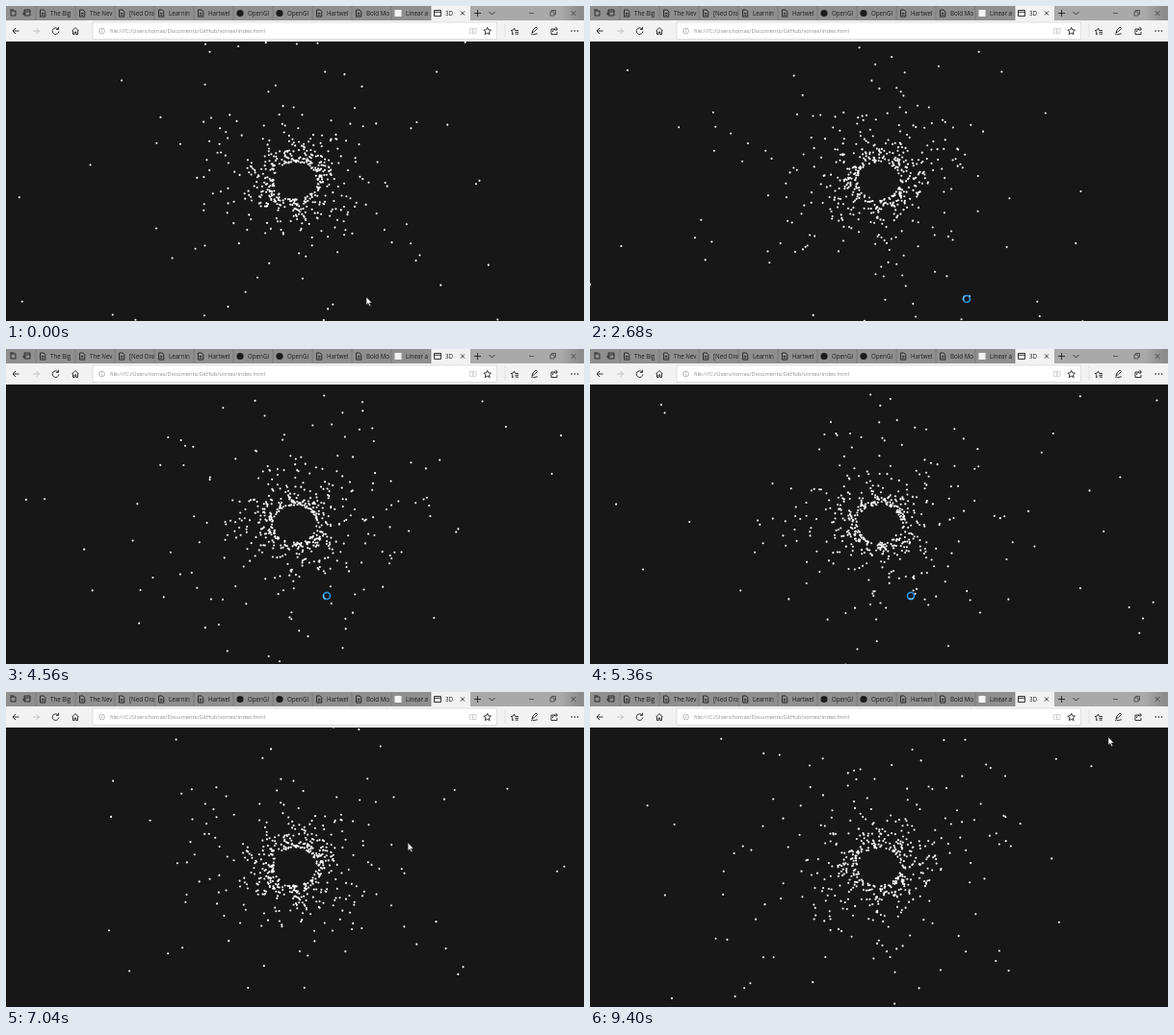
Animation of 600 by 328 pixels, one loop 9.44 s. Source, as an HTML page with a canvas:

```html
<!DOCTYPE html>
<html lang="en">
<head>
<meta charset="utf-8">
<title>3D</title>
<style>
  html, body { margin: 0; width: 100%; height: 100%; overflow: hidden; background: #171718; }
  canvas, svg { position: absolute; left: 0; top: 0; width: 600px; height: 328px; }
  text { font-family: "Open Sans", "Noto Sans", sans-serif; }
  .line { fill: none; stroke: #222; stroke-width: .9; }
  .thin { stroke-width: .6; }
  .pale { stroke: #bbb; }
</style>
</head>
<body>
<canvas id="space" width="600" height="328"></canvas>
<svg viewBox="0 0 600 328">
  <linearGradient id="glass">
    <stop offset=".8" stop-color="#a9a9a9"/>
    <stop offset=".96" stop-color="#8c8c8c"/>
  </linearGradient>
  <rect width="600" height="15" fill="#8f8f8f"/>
  <rect x="482" width="118" height="15" fill="url(#glass)"/>
  <rect y="15" width="600" height="22" fill="#f2f2f2"/>
  <g id="tabs" font-size="6.2" fill="#1c1c1c"></g>

  <!-- window controls -->
  <path class="line" d="M5 5h5v5h-5zM4 4h4M19 4h6v6h-6zM19 6h6M21 8h-4"/>
  <path class="line" d="M486 7.500h7M489.500 4v7M501.500 6l3 3 3-3"/>
  <path class="line thin" d="M543 7.500h5M565 6h4v4h-4zM566.500 6v-1.500h4v4h-1.500M586.500 5l5 5m0-5l-5 5"/>

  <!-- address row -->
  <path class="line" d="M13.500 26h-6.500M10 23l-3 3 3 3"/>
  <path class="line pale" d="M28 26h6.500M31.500 23l3 3-3 3"/>
  <path class="line" d="M54 24a3.300 3.300 0 1 0 .8 2.500M54.500 21.800v2.500h-2.500"/>
  <path class="line" d="M68.500 26l3.500-3.500 3.500 3.500M69.500 25.500v4h1.700v-2.500h1.600v2.500h1.700v-4"/>
  <rect x="90" y="17" width="419.500" height="17.500" fill="#fff" stroke="#d4d4d4" stroke-width=".7"/>
  <g fill="none" stroke="#999" stroke-width=".7">
    <circle cx="99.500" cy="26" r="2.900"/>
    <path d="M99.500 25.500v2M99.500 24.200v.7"/>
    <path d="M481.500 23.500h3.300v5h-3.300zM484.800 23.500h3.300v5h-3.300z" stroke="#c4c4c4"/>
    <path d="M518 18v15" stroke="#ddd"/>
  </g>
  <text x="108" y="28.200" font-size="5.750" fill="#8b8b8b">file:///C:/Users/tomas/Documents/GitHub/vortex/index.html</text>
  <rect id="hover" x="538.500" y="16" width="19" height="19" fill="#dcdcdc" stroke="#bdbdbd" stroke-width=".7"/>
  <g class="line">
    <path d="M499.700 22.300l1.100 2.500 2.700.3-2 1.800.6 2.700-2.400-1.400-2.400 1.400.6-2.700-2-1.800 2.700-.3z"/>
    <path d="M527 29l-1.500.5.4-2.400-1.700-1.600 2.300-.4 1-2.100 1 2.100M528.500 25.500h3.500M528.500 27.300h3.500M528.500 29.100h3.500"/>
    <path d="M546 28l1-3 3-3 1.500 1.500-3 3zM545 29.500c2-1.500 2 1 4 0s2-.5 3-.5"/>
    <path d="M570 24h-4v5.500h6v-2.500M567.500 27c.2-2 1.500-3 4.500-3M570.500 22l2 2-2 2"/>
  </g>
  <path d="M586.500 26h8" stroke="#333" stroke-width="1.300" stroke-dasharray="1.300 1.900"/>

  <path id="arrow" d="M0 0v8.200l1.900-1.700 1.400 3 1.300-.6-1.400-2.900h2.600z" fill="#fff" stroke="#222" stroke-width=".5"/>
  <g id="busy" fill="none" stroke-width="1.600">
    <circle r="3.500" stroke="#2b95dc"/>
    <path id="glint" d="M0-3.500a3.500 3.500 0 0 1 3.500 3.500" stroke="#62c3f7"/>
  </g>
</svg>
<script>
const LOOP = 9440, STEP = 40;
const CX = 300, CY = 182, RX = 22.2, RY = 19.4;
const COUNT = 560, DOT = 1.05;
const $ = id => document.getElementById(id);

// ---- tabs ----
const tabs = [
  ["page", "The Big"], ["page", "The Nev"], ["page", "[Ned Ora"], ["page", "Learnin"],
  ["page", "Hartwel"], ["dot", "OpenGl"], ["dot", "OpenGl"], ["page", "Hartwel"],
  ["page", "Bold Mo"], ["square", "Linear a"], ["window", "3D"]
];
const icons = {
  page: '<path class="line" d="M-2.500-3.500h3.500l1.800 1.800v5.300h-5.300zM-1.200 0h2.600M-1.200 1.700h2.600"/>',
  dot: '<circle r="3.600" fill="#1c1c1c"/>',
  square: '<rect x="-3.500" y="-3.500" width="7" height="7" fill="#f4f4f4"/>',
  window: '<path class="line" d="M-3.500-3h7v6h-7zM-3.500-1.200h7"/>'
};
$("tabs").innerHTML = tabs.map(([icon, label], i) => {
  const x = 31 + 41 * i, active = i === tabs.length - 1;
  return (active ? `<rect x="${x}" width="41" height="15.500" fill="#f2f2f2"/>` : "") +
    `<path d="M${x} 0v15" stroke="#747474" stroke-width=".7"/>` +
    `<g transform="translate(${x + 7} 7.500)">${icons[icon]}</g>` +
    `<text x="${x + 15}" y="9.800">${label}</text>` +
    (active ? `<path class="line" d="M${x + 31} 5.500l4 4m0-4l-4 4"/>` : "");
}).join("");

// ---- tunnel of points ----
let seed = 7321;
function rand() {
  seed = (seed * 1664525 + 1013904223) % 4294967296;
  return seed / 4294967296;
}
const points = Array.from({ length: COUNT }, () => ({ angle: rand() * 2 * Math.PI, z: rand() }));

// The picture hangs a few times before it runs smoothly.
const hangs = [440, 600, 800];
function travel(t) {
  const jumps = hangs.filter(h => t >= h).length;
  return jumps * .0075 + Math.max(0, t - 800) / STEP * .0065;
}

const ctx = $("space").getContext("2d");
function drawPoints(t) {
  const shift = travel(t);
  ctx.fillStyle = "#171718";
  ctx.fillRect(0, 0, 600, 328);
  ctx.fillStyle = "#fff";
  ctx.beginPath();
  for (const p of points) {
    const z = (p.z - shift + 3) % 1 || 1;
    const x = CX + Math.cos(p.angle) * RX / z;
    const y = CY + Math.sin(p.angle) * RY / z;
    ctx.moveTo(x + DOT, y);
    ctx.arc(x, y, DOT, 0, 2 * Math.PI);
  }
  ctx.fill();
}

// ---- pointer: time, x, y ----
const path = [
  [0, 374, 303], [800, 374, 303], [1840, 380, 291], [2400, 391, 305], [3000, 391, 305],
  [3700, 333, 257], [6560, 333, 257], [7680, 547, 3], [7920, 543, 28], [8480, 543, 28],
  [8720, 538, 47], [LOOP, 538, 47]
];
const BUSY_FROM = 2400, BUSY_TO = 6560;

function pointerAt(t) {
  const i = path.findIndex(k => k[0] > t);
  const [t0, x0, y0] = path[i - 1], [t1, x1, y1] = path[i];
  const k = (t - t0) / (t1 - t0), e = k * k * (3 - 2 * k);
  return [x0 + (x1 - x0) * e, y0 + (y1 - y0) * e];
}

function show(id, on) {
  $(id).style.display = on ? "" : "none";
}

function drawPointer(t) {
  const [x, y] = pointerAt(t);
  const busy = t >= BUSY_FROM && t < BUSY_TO;
  for (const id of ["arrow", "busy"]) $(id).setAttribute("transform", `translate(${x} ${y})`);
  $("glint").setAttribute("transform", `rotate(${t * .36})`);
  show("arrow", !busy);
  show("busy", busy);
  show("hover", x > 538 && x < 558 && y > 16 && y < 35);
}

const start = performance.now();
function frame() {
  const now = Math.max(0, performance.now() - start) % LOOP;
  const t = Math.floor(now / STEP) * STEP;
  drawPoints(t);
  drawPointer(t);
  requestAnimationFrame(frame);
}
frame();
</script>
</body>
</html>
```
